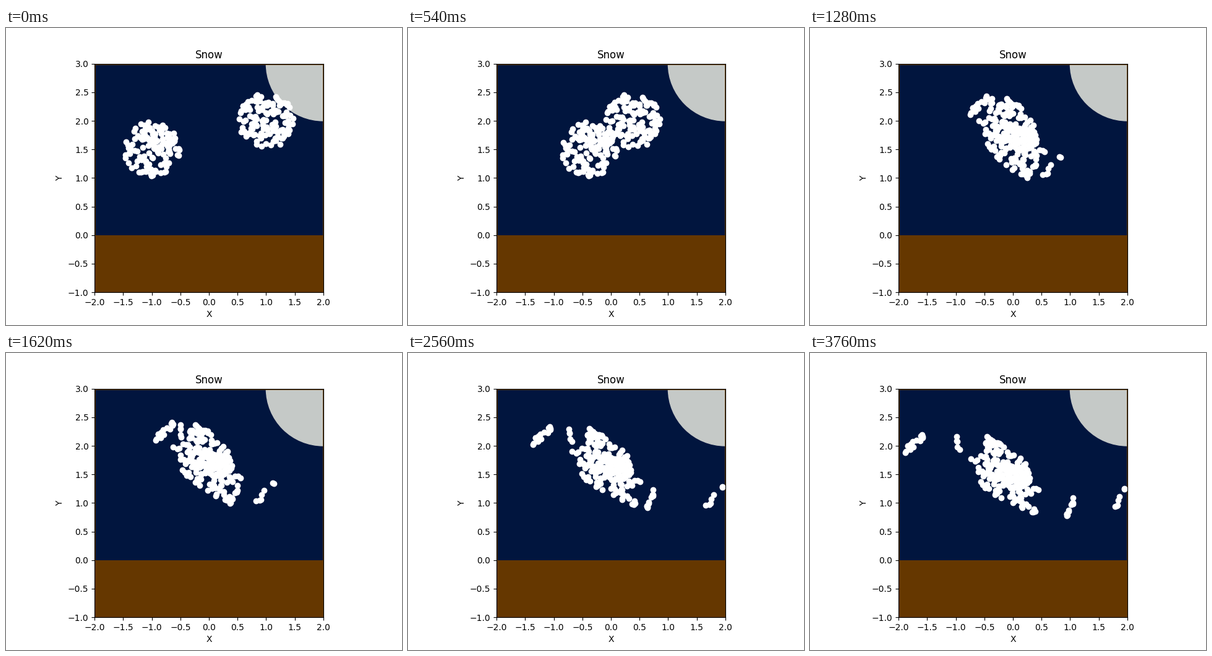
These frames come from a looping animation (640x480 px, 3.78 s). A matplotlib script:

```python
import numpy as np
import matplotlib.pyplot as plt
from matplotlib.animation import FuncAnimation
from matplotlib.patches import Circle, Rectangle

FRAMES, INTERVAL = 189, 20
SCALE = 92.4                  # pixels per data unit
FLAKES, RADIUS = 130, 45      # per ball, radius in pixels
SPEED = 2.11                  # pixels per frame before contact
FALL = 6.8e-4                 # half of gravity, pixels per frame squared
WALL_X, WALL_FRAME = 508, 128

rng = np.random.default_rng(4)


def ball():
    """Flakes in a disc: p points along the flight, q away from the other ball."""
    r = RADIUS * np.sqrt((np.arange(FLAKES) + rng.random(FLAKES)) / FLAKES)
    a = 2 * np.pi * rng.random(FLAKES)
    return r * np.cos(a), r * np.sin(a)


def braking(p, q, core, clump, front):
    """Final speed and braking time of each flake.

    Flakes that miss the other ball break off as a clump and a faster front;
    the rest merge into the core.
    """
    lag = 0.2 * (p + 14) * np.clip(q / 20, 0, 1)
    core_stop = np.maximum(45, core[1] + core[2] * q) - lag
    clump_stop = np.maximum(40, clump[1] - clump[2] * p)
    free = q > 8
    is_front = free & (p + q > 48)
    is_clump = free & (p + q > 32)
    cases = [is_front, is_clump]
    v_end = np.select(cases, [front[0], clump[0]], core[0])
    stop = np.select(cases, [front[1], clump_stop], core_stop)
    return v_end, stop, is_front


def glide(n, v_end, stop):
    """Distance covered: constant speed, then exponential decay to v_end."""
    tau = np.clip(6 + 0.95 * (stop - 45), 6, 25)
    s = np.maximum(0, n - (stop - tau))
    brake = (SPEED - v_end) * (s - tau * (1 - np.exp(-s / tau)))
    return SPEED * n - brake


class Snowball:
    def __init__(self, cx, cy, side, hits_wall, **rules):
        p, q = ball()
        self.side = side
        self.x, self.y = cx + side * p, cy + side * q
        self.v_end, self.stop, is_front = braking(p, q, **rules)
        self.touch = np.where(is_front & hits_wall, WALL_FRAME, FRAMES)

    def at(self, n):
        m = np.minimum(n, self.touch)
        late = n - m
        x = self.x + self.side * glide(m, self.v_end, self.stop)
        x = np.minimum(x, WALL_X)
        # Flakes behind the first to touch the wall close up, then rest.
        x += 0.44 * (WALL_X - x) * (1 - np.exp(-late / 7))
        y = self.y + FALL * (m ** 2 + late ** 2)
        return (x - 328) / SCALE, (427.2 - y) / SCALE - 1


# core and clump: final speed, braking time, slope; front: speed, time
balls = [
    Snowball(235.6, 196.2, 1, True,
             core=(-0.09, 48, 0.65), clump=(0.48, 55, 0.35), front=(1.64, 45)),
    Snowball(420.4, 150, -1, False,
             core=(0.09, 50, 0.4), clump=(0.385, 66, 0.75), front=(0.8, 57)),
]

fig, ax = plt.subplots(figsize=(6.4, 4.8), dpi=100)
ax.set_aspect("equal")
ax.set(xlim=(-2, 2), ylim=(-1, 3), title="Snow", xlabel="X", ylabel="Y")
ax.add_patch(Rectangle((-2, 0), 4, 3, color="xkcd:navy", lw=0))
ax.add_patch(Rectangle((-2, -1), 4, 1, color="xkcd:brown", lw=0))
ax.add_patch(Circle((2, 3), 1, color="xkcd:silver"))
ax.add_patch(Rectangle((-2, -1), 4, 4, fill=False, ec="xkcd:brown", lw=2))
snow = ax.scatter([], [], color="white", zorder=2)


def update(n):
    snow.set_offsets(np.hstack([b.at(n) for b in balls]).T)
    return snow,


anim = FuncAnimation(fig, update, frames=FRAMES, interval=INTERVAL,
                     repeat=True, repeat_delay=0)
plt.show()
```
